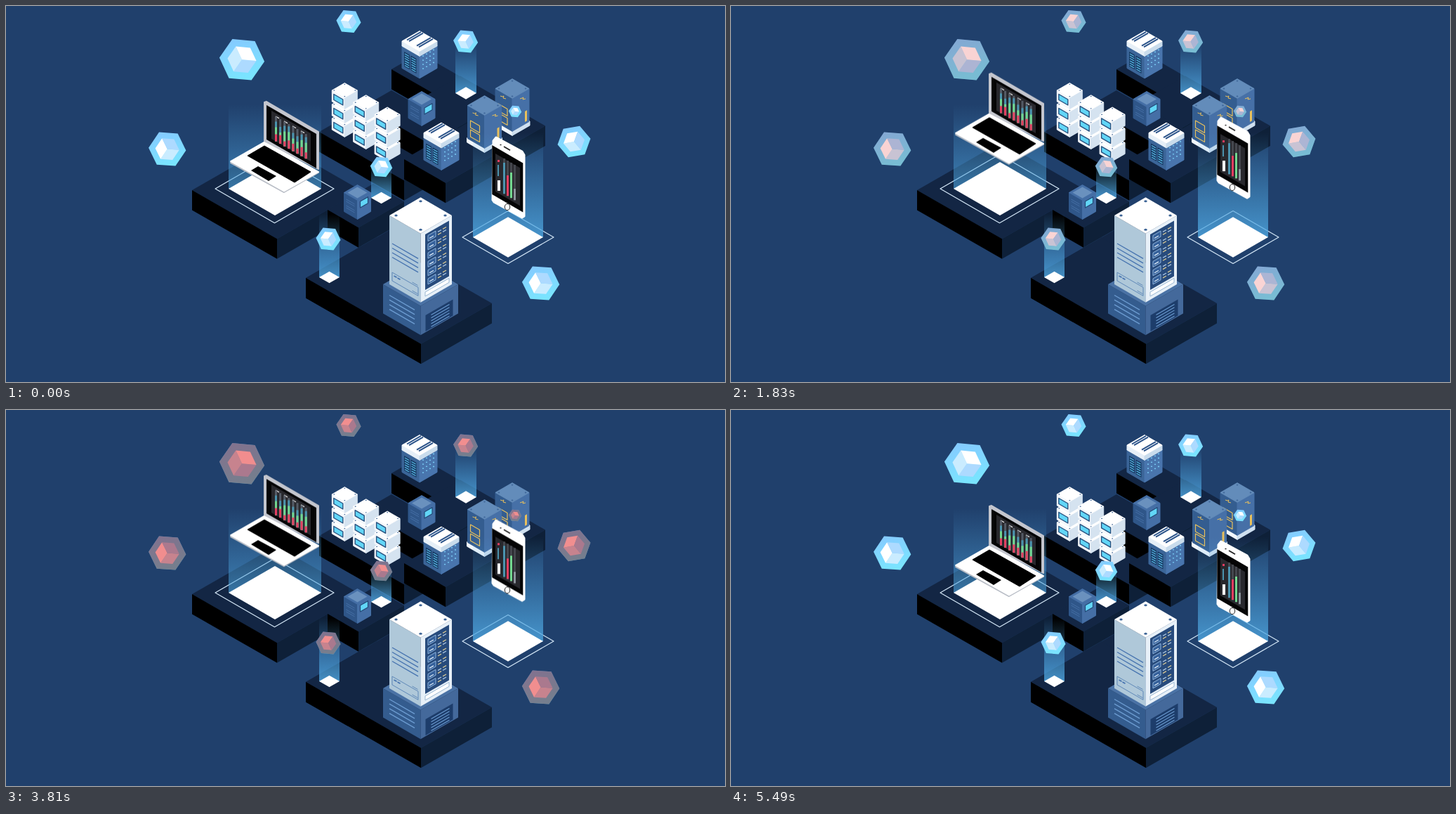
These frames come from a looping animation (1024x535 px, 5.55 s). An HTML page:

```html
<!DOCTYPE html>
<html lang="en">
<head>
<meta charset="utf-8">
<title>Isometric data centre</title>
<style>
  html, body { margin: 0; width: 100%; height: 100%; overflow: hidden; background: #20406c; }
  svg { display: block; width: 100%; height: 100%; }
  .float { animation: float 5550ms linear infinite; }
  .laptop { --lift: -49px; }
  .phone { --lift: -34px; }
  .alert { opacity: 0; animation: alert 5550ms linear infinite; }
  @keyframes float {
    0%, 3.24% { transform: translateY(0); }
    39.46%, 64.32% { transform: translateY(var(--lift)); }
    98.92%, 100% { transform: translateY(0); }
  }
  @keyframes alert {
    0%, 31.2% { opacity: 0; }
    40.54%, 63.78% { opacity: 1; }
    73.51%, 100% { opacity: 0; }
  }
</style>
</head>
<body>
<svg id="stage" viewBox="0 0 1024 535">
  <defs>
    <linearGradient id="beam" x1="0" y1="0" x2="0" y2="1">
      <stop offset="0" stop-color="#4ea6e0" stop-opacity="0"/>
      <stop offset="1" stop-color="#4ea6e0" stop-opacity=".82"/>
    </linearGradient>
    <linearGradient id="ice" x1="0" y1="0" x2=".3" y2="1">
      <stop offset="0" stop-color="#86c8ff"/>
      <stop offset="1" stop-color="#7ae4ff"/>
    </linearGradient>
    <linearGradient id="ruby" x1="0" y1="0" x2="1" y2="1">
      <stop offset="0" stop-color="#83191d"/>
      <stop offset="1" stop-color="#6c171b"/>
    </linearGradient>
  </defs>
</svg>
<script>
const SLOPE = 0.577;
const CYAN = '#62d6f7', GOLD = '#e8c05c', RED = '#e43d60', GREEN = '#72d78f', TEAL = '#4a93ae';

const repeat = (n, draw) => Array.from({ length: n }, (_, i) => draw(i)).join('');
const at = (x, y, content) => `<g transform="translate(${x} ${y})">${content}</g>`;
const stroke = (color, width = 1) => `stroke="${color}" stroke-width="${width}" stroke-linejoin="round"`;
const poly = (points, fill, extra = '') => `<polygon points="${points}" fill="${fill}" ${extra}/>`;
const solid = (points, fill, width = 1) => poly(points, fill, stroke(fill, width));
const rect = (x, y, w, h, fill) => `<rect x="${x}" y="${y}" width="${w}" height="${h}" fill="${fill}"/>`;
const dot = (x, y, r, fill) => `<ellipse cx="${x}" cy="${y}" rx="${r}" ry="${r * 0.7}" fill="${fill}"/>`;

// Isometric pieces; dir 1 descends to the right, -1 climbs to the right.
const slant = (x, y, w, dir, color, width = 1) =>
  `<path d="M${x} ${y}l${w} ${dir * w * SLOPE}" ${stroke(color, width)}/>`;
const wallPoints = (x, y, w, h, dir) => {
  const end = y + dir * w * SLOPE;
  return [x, y, x + w, end, x + w, end + h, x, y + h];
};
const wall = (x, y, w, h, dir, fill, extra) => poly(wallPoints(x, y, w, h, dir), fill, extra);
const tile = (x, y, w) => [x - w, y, x, y - w * SLOPE, x + w, y, x, y + w * SLOPE];

// Upright box centred on x = 0 whose lid has its middle at y.
function prism(w, y, h, left, right, lid, round = 1) {
  return solid(wallPoints(-w, y, w, h, 1), left, round) +
    solid(wallPoints(0, y + w * SLOPE, w, h, -1), right, round) +
    solid(tile(0, y, w), lid, round);
}
const screws = (y, w, r) =>
  [[-w, 0], [w, 0], [0, -w], [0, w]].map(([dx, dy]) => dot(dx, y + dy * SLOPE, r, '#3e6597')).join('');

// Platform from its left corner and the lengths of its two front edges.
function slab(x, y, a, b) {
  const s = 0.572, h = 28.5;
  const front = [x + a, y + a * s], right = [x + a + b, y + (a - b) * s];
  const down = ([px, py]) => [px, py + h];
  return poly([x, y, x + b, y - b * s, right, front], '#132644') +
    poly([front, right, down(right), down(front)], '#0e2038') +
    poly([[x, y], front, down(front), down([x, y])], '#000');
}

function beam(x, top, base, w, strength = 1) {
  return `<g opacity="${strength}">${rect(x - w, top, 2 * w, base - top, 'url(#beam)')}</g>` +
    poly(tile(x, base, w), '#fff');
}
const pad = (x, y, w) => poly(tile(x, y, w), 'none', stroke('#d3e6f6', 1.2));

const platforms = () =>
  slab(549, 90, 58, 40) + slab(578, 139, 62, 69) +
  slab(265, 262, 121, 120) + slab(446, 179, 121, 103) +
  wall(559, 171, 50, 29, 1, '#000') + slab(567, 218, 59, 142) +
  slab(427, 387, 60, 139) + slab(427, 387, 164, 101) + slab(458, 290, 44, 65);

// Each small machine hangs from the back corner of its lid.
function ventServer() {
  const slot = i => {
    const k = 3 * (i % 2) + 14 * (i >> 1);
    return slant(-18 + k, 15.5 + k * SLOPE, 20, -1, '#2c548a', 2);
  };
  const grille = i => at(i * 9.5, i * 9.5 * SLOPE, wall(-22, 32, 8, 21, 1, '#173961') +
    repeat(6, j => slant(-21, 35 + j * 3.3, 6, 1, '#58b9e6', 1.2)));
  const lamp = i => {
    const x = 5 + (i % 4) * 5;
    return dot(x, 41 + (i >> 2) * 6 - x * SLOPE, 1.2, '#78c8f2');
  };
  return prism(25, 22.5, 33, '#3b6598', '#4975ad', '#4975ad') +
    prism(25, 17, 7, '#e6eff7', '#c9dcec', '#fff') +
    repeat(4, slot) + repeat(2, grille) + repeat(16, lamp);
}

function screenBox() {
  return prism(19, 10.5, 27, '#2f5689', '#456fa6', '#456fa6') +
    poly(tile(0, 10.5, 14), '#6a91be') +
    wall(4, 23, 11, 9, -1, CYAN, stroke('#234977', 1.2)) +
    repeat(4, i => slant(-16, 20 + i * 3 + (i >> 1) * 3, 12, 1, '#456fa5'));
}

function goldServer() {
  const zigzag = (x, y, s) => `<path d="M${x} ${y}l3 ${s}l2 -1l-1 3l4 ${s}" fill="none" ${stroke(GOLD)}/>`;
  return prism(25, 60, 6, '#f2f7fc', '#cfe0f0', '#fff') +
    prism(24, 13.5, 47, '#345d90', '#4670a7', '#638cba') +
    screws(13.5, 19, 1.3) +
    repeat(2, i => wall(-20, 35 + i * 13, 13, 10, 1, 'none', stroke(GOLD, 1.2))) +
    zigzag(-17, 24, 1) + zigzag(11, 28, -1) + wall(18, 46, 3, 15, -1, GOLD);
}

function storageStack() {
  const unit = prism(18, 11, 16, '#f3f7fb', '#d5e3f0', '#fff') +
    wall(-15.5, 16.5, 13, 8, 1, CYAN, stroke('#28517f', 1.4)) + screws(11, 15, 1);
  return repeat(3, i => at(0, 40 - i * 20, unit));
}

function mainTower() {
  const pedestal = prism(53.5, 0, 41.5, '#345c8e', '#44699b', '#4a72a5', 0) +
    repeat(4, i => slant(-44.5, 15.5 + i * 6.7, 36, 1, '#6b9bd0', 1.4)) +
    wall(7, 44, 39, 23, -1, '#1d3d6b') +
    repeat(5, i => slant(15, 43.5 + i * 4.2, 26, -1, '#6b9bd0', 1.1));
  const drive = i => at(0, 28.5 + i * 12.3,
    wall(10.5, 0, 11, 8, -1, '#35609a', stroke('#8fb4dc')) +
    slant(12.5, 4, 6, -1, '#dbe9f6', 1.3) +
    repeat(4, j => {
      const x = 24.5 + (j % 2) * 7;
      return slant(x, 9 + (j >> 1) * 4 - x * SLOPE, 5, -1, j % 3 ? '#d5c795' : '#a9c4e0', 1.3);
    }));
  const cabinet = prism(44.5, 0, 98, '#afc8d9', '#e7f0f8', '#fff', 0) +
    screws(0, 35, 2.2) +
    wall(6.5, 27, 34, 79, -1, '#284b7c') + repeat(6, drive) +
    wall(6.5, 109, 34, 6, -1, '#fff', stroke('#9bb8d3')) +
    repeat(4, i => slant(-40.5, 40 + i * 6.5, 37, 1, '#4774b0', 1.4)) +
    wall(-40.5, 81, 37, 12, 1, 'none', stroke('#5f88b8')) +
    repeat(2, i => slant(-38 + i * 5, 86 + i * 3, 4, 1, '#4774b0', 1.8) +
      slant(-12, 95 + i * 12, 8, 1, '#5f88b8'));
  return at(590.5, 396, pedestal) + at(590.5, 298, cabinet);
}

function laptop() {
  const bar = i => {
    const h = 35, red = 10 + 3 * Math.sin(i * 2.3), level = 7 + 4 * Math.sin(i * 1.7);
    return at(383 + i * 6.1, 157.5 + i * 6.1 * SLOPE,
      rect(0, 0, 3, h, '#555b66') + rect(0, level, 3, h - level, TEAL) +
      rect(0, level + 8, 3, h - level - 8, GREEN) + rect(0, h - red, 3, red, RED));
  };
  return solid('369,194 445,237 396,265 320,223', '#b7bcc5', 2) +
    solid('369,193 445,236 396,263.5 320,221', '#fff', 2) +
    solid('344,213 368,199 434,236 411,251', '#000') +
    poly('349,234 359,228 385,242 374,249', '#000') +
    solid('368,137 371,136 445,179 445,232 368,192', '#c4c6ce', 2) +
    wall(371, 141, 71, 49, 1, '#050506') +
    wall(378, 149, 56, 40, 1, '#28282d') +
    repeat(4, i => slant(384 + i * 12, 157 + i * 12 * SLOPE, 5, 1, '#ddd', 1.4)) +
    repeat(8, bar);
}

function phone() {
  const tracks = [[TEAL, 6], [RED, 21], [GREEN, 14], ['#8b919a', 34]];
  const bars = tracks.map(([color, level], i) => at(708 + i * 5, 217 + i * 3,
    rect(0, 0, 3, 51, '#45474e') + rect(0, level, 3, 50 - level, color))).join('');
  return solid('694,192 698,187 735,207 738,212 738,299 735,301 695,279 693,276', '#fff', 3) +
    wall(692.3, 198, 44, 70, 1, '#050506') +
    wall(697, 210, 35, 54, 1, '#28282d') +
    slant(709, 200, 9, 1, '#222', 1.8) + dot(704.5, 197.5, 1.2, '#222') +
    `<ellipse cx="714" cy="286" rx="3.7" ry="4.6" fill="#fff" ${stroke('#222')}/>` +
    rect(700, 219, 3, 3, RED) + rect(700, 226, 2, 16, TEAL) + rect(700, 248, 4, 15, '#fff') + bars;
}

// The inner cube's seams start at angle `turn`; faces follow clockwise.
function cube(x, y, r, turn, shell, faces) {
  const point = (k, radius) => {
    const a = (turn + k * 60) * Math.PI / 180;
    return [x + radius * Math.cos(a), y + radius * Math.sin(a)];
  };
  const corners = Array.from({ length: 6 }, (_, k) => point(k, r));
  return poly(corners, `url(#${shell})`) + faces.map((fill, i) =>
    poly([[x, y], ...[0, 1, 2].map(k => point(i * 2 + k, r * 0.64))], fill)).join('');
}

function swarm(shell, bright, mid, low) {
  const litRight = (x, y, r) => cube(x, y, r, 5, shell, [low, mid, bright]);
  const litLeft = (x, y, r, turn) => cube(x, y, r, turn, shell, [mid, bright, low]);
  const small = 17.6, medium = 26.7;
  return litRight(336, 76.3, 32.2) + litRight(534.5, 229, 15.8) + litRight(725, 150, 9.2) +
    litLeft(488, 22, small, 65) + litLeft(654.6, 50.5, small, 65) + litLeft(459, 331.5, small, 65) +
    litLeft(229.7, 203.6, medium, 4) + litLeft(761.6, 394.5, medium, 4) + litLeft(809, 193, 23.8, 50);
}

document.getElementById('stage').innerHTML += [
  platforms(),
  at(589, 33, ventServer()),
  at(592, 122, screenBox()),
  at(721, 104, goldServer()),
  at(681.5, 128, goldServer()),
  at(620, 163.5, ventServer()),
  repeat(3, i => at(482.3 + i * 30.4, 109 + i * 17.2, storageStack())),
  at(500.5, 255, screenBox()),
  beam(655, 54, 124, 15),
  beam(534.5, 222, 273, 14.5),
  beam(460.5, 296, 386, 14.5),
  mainTower(),
  pad(382.5, 260, 84.5),
  beam(383, 140, 260, 66, 0.75),
  pad(715, 329, 65),
  beam(715, 180, 329, 50),
  `<g class="float laptop">${laptop()}</g>`,
  `<g class="float phone">${phone()}</g>`,
  swarm('ice', '#fff', '#caecff', '#addaff'),
  `<g class="alert">${swarm('ruby', '#e31b1d', '#c4191c', '#a9181c')}</g>`,
].join('');
</script>
</body>
</html>
```
